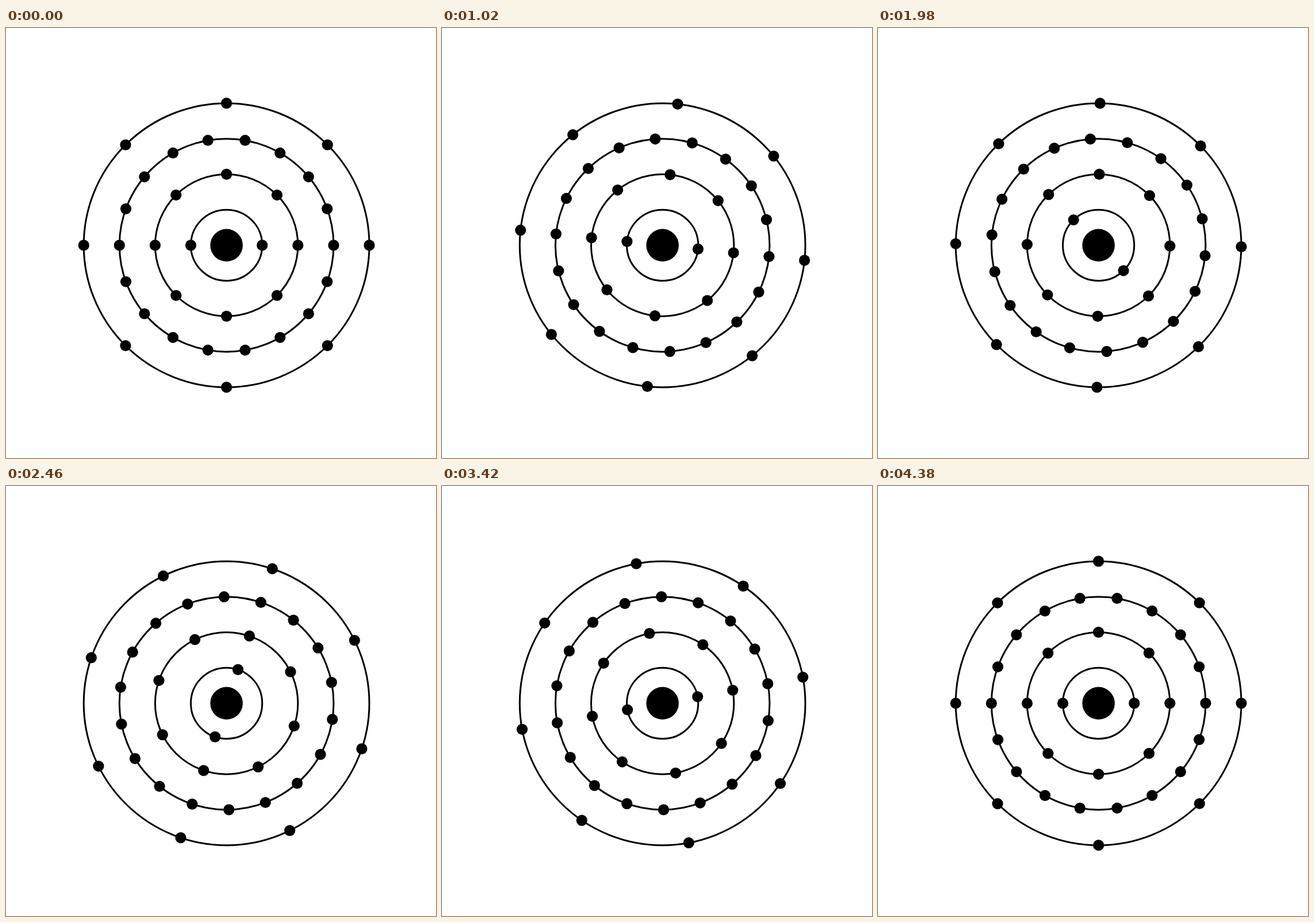
Animation, 748 px wide and 748 px high, one loop 4.51 s. Source, as an HTML page with a canvas:

```html
<!DOCTYPE html>
<html lang="en">
<head>
<meta charset="utf-8">
<title>Spinning atom</title>
<style>
  html, body { margin: 0; width: 100%; height: 100%; overflow: hidden; background: #fff; }
  canvas { display: block; width: 748px; height: 748px; }
</style>
</head>
<body>
<canvas id="stage" width="748" height="748"></canvas>
<script>
const ctx = document.getElementById('stage').getContext('2d');

const LOOP = 4510, STEP = 30, STEPS = 150, LAST_STEP = 146;
const TURNS = 2, RAMP = 0.03;
const CENTER = { x: 383.6, y: 377.9 };
const GAP = { x: 62.1, y: 61.75 };
const SHELLS = [2, 8, 18, 8];
const NUCLEUS = 28.3, ELECTRON = 9.6, LINE = 3;

// Brief cubic ease-in up to RAMP, then a long cubic ease-out.
function ease(x) {
  return x < RAMP ? x ** 3 / RAMP ** 2 : 1 - (1 - x) ** 3 / (1 - RAMP) ** 2;
}

function disc(x, y, radius) {
  ctx.beginPath();
  ctx.arc(x, y, radius, 0, 2 * Math.PI);
  ctx.fill();
}

function drawShell(count, index, spin) {
  const rx = GAP.x * (index + 1), ry = GAP.y * (index + 1);
  ctx.beginPath();
  ctx.ellipse(CENTER.x, CENTER.y, rx, ry, 0, 0, 2 * Math.PI);
  ctx.stroke();
  for (let i = 0; i < count; i++) {
    const angle = spin + i / count * 2 * Math.PI;
    disc(CENTER.x + rx * Math.cos(angle), CENTER.y + ry * Math.sin(angle), ELECTRON);
  }
}

function draw(time) {
  const step = Math.min(Math.floor(time % LOOP / STEP), LAST_STEP);
  const spin = TURNS * 2 * Math.PI * ease(step / STEPS);
  ctx.fillStyle = '#fff';
  ctx.fillRect(0, 0, 748, 748);
  ctx.fillStyle = ctx.strokeStyle = '#000';
  ctx.lineWidth = LINE;
  disc(CENTER.x, CENTER.y, NUCLEUS);
  SHELLS.forEach((count, index) => drawShell(count, index, spin));
}

let start;
function tick(now) {
  start ??= now;
  draw(Math.max(0, now - start));
  requestAnimationFrame(tick);
}
draw(0);
requestAnimationFrame(tick);
</script>
</body>
</html>
```
